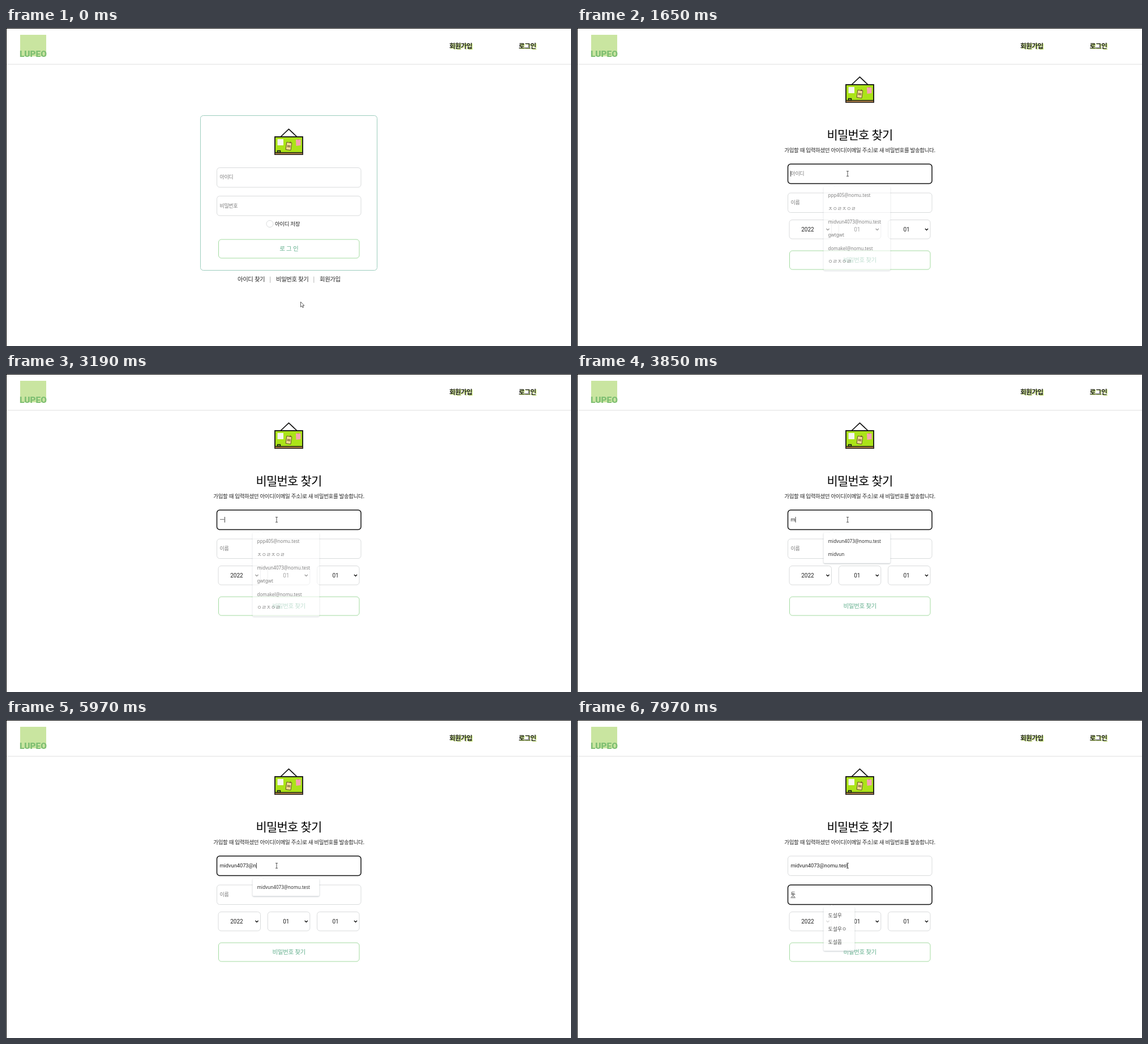
Animation, 998 px wide and 561 px high, one loop 8000 ms. Source, as an HTML page:

```html
<!DOCTYPE html>
<html lang="ko">
<head>
<meta charset="utf-8">
<title>비밀번호 찾기</title>
<style>
  html, body { margin: 0; width: 100%; height: 100%; overflow: hidden; background: #fff; }
  svg { display: block; width: 998px; height: 561px; }
  text { font-family: Roboto, "Noto Sans CJK KR", "Noto Sans CJK", sans-serif; fill: #222; white-space: pre; }
  .ko { font-family: "Noto Sans CJK KR", "Noto Sans CJK", sans-serif; letter-spacing: -.04em; }
  .menu text { font-family: "Noto Sans", "Noto Sans CJK KR", "Noto Sans CJK", sans-serif; fill: #333; }
  .menu .panel { filter: drop-shadow(0 1px 1.2px rgba(40, 60, 70, .32)); }
  .nav { text-shadow: 1.5px 1px 1px #c3e567; }
</style>
</head>
<body>
<svg id="stage" viewBox="0 0 998 561"></svg>
<script>
const LOOP = 8000;
const stage = document.getElementById('stage');

// Text centred vertically on cy
const label = (x, cy, size, str, attrs = '') =>
  `<text x="${x}" y="${cy + size * .36}" font-size="${size}" ${attrs}>${str}</text>`;
const ko = (x, cy, size, str, attrs = '') => label(x, cy, size, str, `class="ko" ${attrs}`);
const middle = 'text-anchor="middle"';
const box = (x, y, w, h, stroke = '#d9dbdc', attrs = '') =>
  `<rect x="${x}" y="${y}" width="${w}" height="${h}" rx="5" fill="#fff" stroke="${stroke}" ${attrs}/>`;
const field = (y, id = '') => box(372.5, y, 254.5, 34.5, '#d9dbdc', id && `id="${id}"`);
const button = (y, str) => box(375.5, y, 248.5, 33, '#a3dba0') +
  ko(499.7, y + 16.5, 10.6, str, `${middle} font-weight="500" style="fill:#64b08e"`);
const hint = (y, str, id = '') => ko(377.5, y, 9, str, `style="fill:#7b7b7b" ${id && `id="${id}"`}`);

const board = y => `<g transform="translate(474 ${y})">
  <path d="M11 15 25.5 1.5 40 15" fill="none" stroke="#111" stroke-width="1.7"/>
  <rect x="1" y="15" width="49" height="31" fill="#abe319" stroke="#111" stroke-width="1.8"/>
  <rect x="1.5" y="43.4" width="48" height="2.2" fill="#a9714b"/>
  <path d="M1 42.6H50" stroke="#111" stroke-width="1.4"/>
  <rect x="5.5" y="39.5" width="5" height="3" fill="#8bbf2a" stroke="#111" stroke-width="1.4"/>
  <rect x="5.5" y="19" width="10.5" height="11" fill="#f6f5ee"/>
  <path d="M38 20h8.5v10l-8 1z" fill="#f6a3b4"/>
  <circle cx="42" cy="20" r="1" fill="#e8688a"/>
  <g transform="rotate(8 25 31)">
    <rect x="21" y="25" width="9" height="13" fill="#f4dc92" stroke="#4b3a1c" stroke-width=".8"/>
    <path d="M22.5 30.5h6M22.5 32.5h6" stroke="#5d4420" stroke-width="1"/>
    <circle cx="27.5" cy="24.5" r="1.3" fill="#6f5a2a"/>
  </g></g>`;

const select = (x, value) => box(x, 338.5, 74.5, 33.5) +
  label(x + 32.5, 355, 10, value, middle) +
  `<path d="M${x + 65.4} 354l2.6 2.6 2.6-2.6" fill="none" stroke="#111" stroke-width="1.4"/>`;

stage.innerHTML = `
  <rect width="998" height="561" fill="#fff"/>
  <path d="M0 64H998" stroke="#dedede"/>
  <path d="M0 .5H998M.5 0V561" stroke="#000"/>
  <rect x="25" y="12" width="46" height="38" fill="#c9e5a0"/>
  <text x="48" y="51" font-size="15.5" font-weight="900" text-anchor="middle" style="fill:#7fbf73">LUPEO</text>
  <g class="nav">${ko(783, 32, 11.5, '회원가입', 'font-weight="700"')}
  ${ko(905.5, 32, 11.6, '로그인', 'font-weight="700"')}</g>

  <g id="login">
    ${box(343.5, 154.5, 312, 273, '#9ccdbd')}
    ${board(177)}
    ${field(246.5)}${hint(263, '아이디')}
    ${field(296.5)}${hint(313.5, '비밀번호')}
    <circle cx="466" cy="345.5" r="6" fill="#fff" stroke="#d9dbdc"/>
    ${ko(475, 345.3, 9.5, '아이디 저장')}
    ${button(373, '로 그 인')}
    ${ko(409, 443.5, 10.4, '아이디 찾기')}
    ${ko(477, 443.5, 10.4, '비밀번호 찾기')}
    ${ko(554, 443.5, 10.4, '회원가입')}
    <path d="M466.7 438.5v11M543.8 438.5v11" stroke="#b5b5b5"/>
  </g>

  <g id="find">
    ${board(85)}
    ${ko(499.5, 188.5, 21, '비밀번호 찾기', `${middle} font-weight="500" style="fill:#000"`)}
    ${ko(499.5, 216, 9.5, '가입할 때 입력하셨던 아이디(이메일 주소)로 새 비밀번호를 발송합니다.', middle)}
    ${field(240, 'idBox')}${hint(257, '아이디', 'idHint')}
    ${label(377.5, 257, 9.25, '', 'id="idText"')}
    ${field(291, 'nameBox')}${hint(308, '이름', 'nameHint')}
    ${ko(377.5, 308, 9.2, '', 'id="nameText"')}
    <path id="compose" d="M377.5 313.5h8.3" stroke="#333" stroke-width=".8"/>
    ${select(375, '2022')}${select(462.3, '01')}${select(549.5, '01')}
    ${button(393, '비밀번호 찾기')}
    <path id="caret" stroke="#111" stroke-width=".8"/>
    <g id="menu" class="menu"></g>
  </g>

  <path id="arrow" d="M0 0V9.2l2.1-1.9 1.4 3.1 1.5-.7-1.4-3H6.4Z" fill="#fff" stroke="#333" stroke-width=".8"/>
  <path id="beam" d="M-2-4.4H2M0-4.4V4.4M-2 4.4H2" stroke="#444" stroke-width=".9"/>`;

const el = Object.fromEntries([...stage.querySelectorAll('[id]')].map(n => [n.id, n]));
const show = (node, on) => node.setAttribute('visibility', on ? 'inherit' : 'hidden');

const EMAIL = 'midvun4073@nomu.test';
const KEY_TIMES = [3850, 3980, 4110, 4580, 4710, 4840, 5180, 5310, 5380, 5510, 5710,
  5970, 6040, 6110, 6180, 6300, 6370, 6500, 6650, 6720];

const MENUS = {
  all: ['ppp405@nomu.test', 'ㅈㅇㄹㅈㅇㄹ', EMAIL, 'gwtgwt', 'domakel@nomu.test', 'ㅇㄹㅈㅇㄹ'],
  two: [EMAIL, 'midvun'],
  one: [EMAIL],
  five: ['도설우', '도설우ㅇ', '도설웁', 'ㄷㅇㄷㅇ', 'ㄷㄷㄷ'],
  three: ['도설우', '도설우ㅇ', '도설웁']
};
// [time, list, opacity, top, width]
const MENU_STEPS = [
  [0, 'all', 0], [1650, 'all', .6], [1720, 'all', 1], [3190, 'all', .6], [3250, 'all', .25], [3320, 'all', 0],
  [3850, 'two', 1], [5180, 'one', 1], [6780, 'one', .5], [6840, 'one', 0],
  [7380, 'five', .7, 330, 64], [7440, 'five', 1, 330, 64], [7580, 'five', .5, 330, 64], [7640, 'five', 0],
  [7910, 'three', .5, 330, 55], [7970, 'three', .85, 330, 55]
];

// Pointer: [time, x, y]
const PATH = [[200, 520.5, 483], [600, 509.5, 444], [866, 509.5, 441], [1066, 471, 272],
  [1133, 471, 271], [1200, 471, 271], [1400, 478, 257]];

const last = (steps, t) => steps.filter(s => s[0] <= t).pop();

function pointerAt(t) {
  const q = Math.floor((t + 14) * .015) / .015;
  if (q <= PATH[0][0]) return PATH[0].slice(1);
  const i = PATH.findIndex(p => p[0] > q);
  if (i < 0) return PATH[PATH.length - 1].slice(1);
  const [a, b] = [PATH[i - 1], PATH[i]];
  const k = (q - a[0]) / (b[0] - a[0]);
  return [a[1] + (b[1] - a[1]) * k, a[2] + (b[2] - a[2]) * k];
}

let menuKey = '';
function drawMenu(t) {
  const [, name, opacity, top = 280, width = 118] = last(MENU_STEPS, t);
  el.menu.setAttribute('opacity', opacity);
  if (!opacity || menuKey === name) return;
  menuKey = name;
  const items = MENUS[name], x = 435.5, h = 7 + 23.4 * items.length;
  el.menu.innerHTML =
    `<g class="panel"><rect x="${x}" y="${top}" width="${width}" height="${h}" rx="2" fill="#fff"/>
     <path d="M${x + 9.5} ${top + .5}l5-4.5 5 4.5" fill="#fff"/></g>` +
    items.map((s, i) => label(x + 8, top + 15 + 23.4 * i, /[a-z]/.test(s) ? 8.1 : 8.9, s)).join('');
}

function focus(node, on) {
  node.setAttribute('stroke', on ? '#111' : '#d9dbdc');
  node.setAttribute('stroke-width', on ? 1.5 : 1);
}

function render(t) {
  const onLogin = t < 730;
  show(el.login, onLogin);
  show(el.find, !onLogin);

  const onName = t >= 6980, onId = t >= 1650 && !onName;
  focus(el.idBox, onId);
  focus(el.nameBox, onName);

  const typed = KEY_TIMES.filter(k => k <= t).length;
  const email = t >= 3120 && t < 3450 ? 'ㅡ' : EMAIL.slice(0, typed);
  const name = t < 7310 ? '' : t < 7580 ? 'ㄷ' : t < 7840 ? '도' : '돗';
  el.idText.textContent = email;
  el.nameText.textContent = name;
  show(el.idHint, !onLogin && !email);
  show(el.nameHint, !onLogin && !name);
  show(el.compose, !onLogin && name);

  const blinkOff = t >= 2190 && t < 2720;
  const caretX = 377.6 + (onId && email ? el.idText.getComputedTextLength() + .3 : 0);
  const caretY = onName ? 303 : 252;
  el.caret.setAttribute('d', `M${caretX} ${caretY}v10`);
  show(el.caret, (onId || onName) && !blinkOff && !name);
  drawMenu(t);

  const [x, y] = pointerAt(t);
  const overField = !onLogin && y < 275;
  show(el.arrow, !overField);
  show(el.beam, overField);
  (overField ? el.beam : el.arrow).setAttribute('transform', `translate(${x} ${y})`);
}

const start = performance.now();
function tick() {
  render((performance.now() - start) % LOOP);
  requestAnimationFrame(tick);
}
tick();
</script>
</body>
</html>
```
